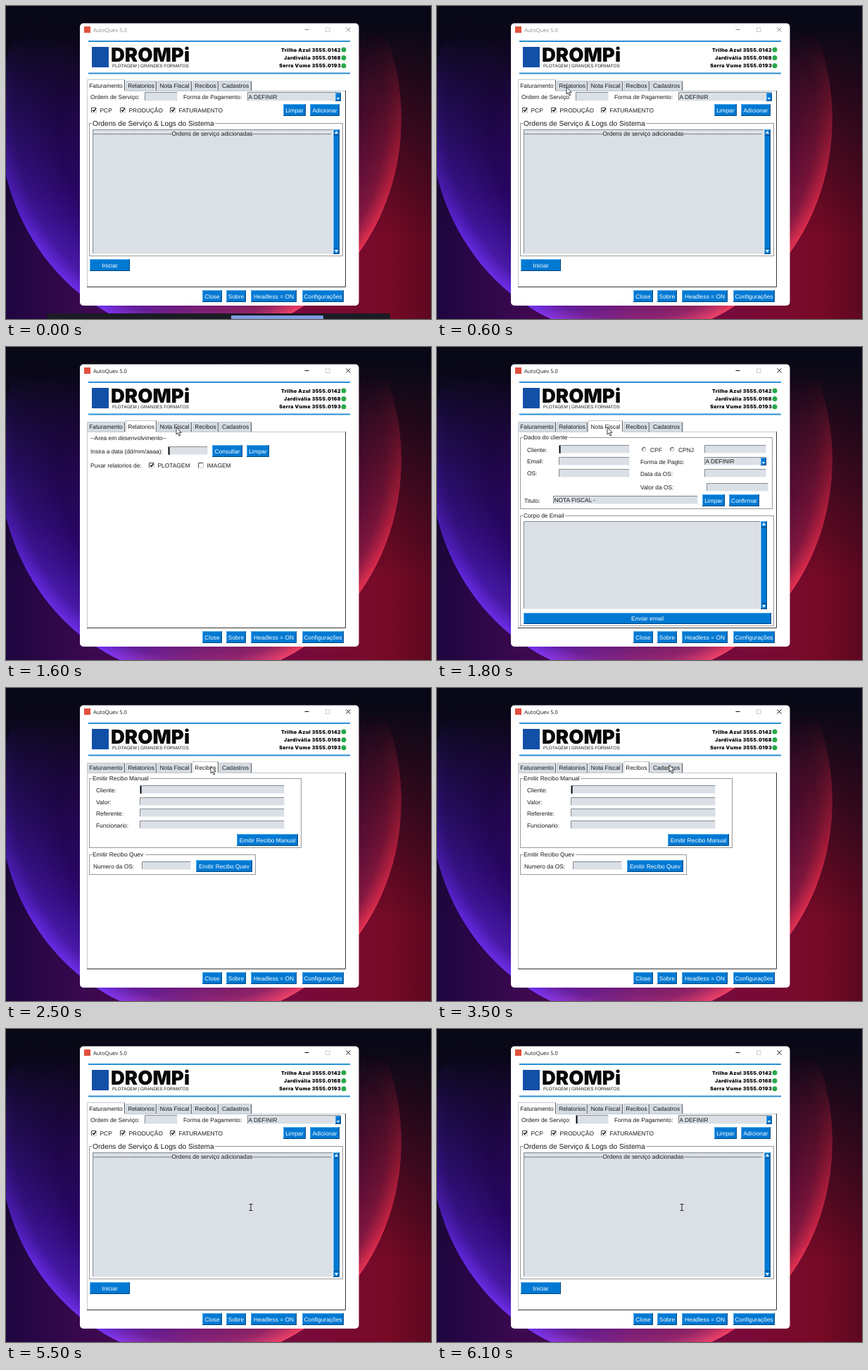
These frames come from a looping animation (604 px wide and 444 px high, 6.2 s). An HTML page:

```html
<!DOCTYPE html>
<html lang="pt">
<head>
<meta charset="utf-8">
<style>
html, body { margin: 0; width: 100%; height: 100%; overflow: hidden; background: #080816; }
svg {
  display: block; width: 604px; height: 444px;
  background:
    linear-gradient(#080816 5%, #08081600 75%),
    linear-gradient(90deg, #1e0640, #3c0850 20%, #780a40 65%, #780a26 90%, #5c0820);
}
text { font: 8.4px "Liberation Sans", Arial, sans-serif; fill: #1a1a1b; white-space: pre; text-rendering: geometricPrecision; }
.btn { fill: #fff; }
.title { font: 7.6px "Open Sans", sans-serif; }
.big { font-size: 10.2px; }
.brand { font: 900 27.5px Inter, sans-serif; fill: #080808; }
.slogan { font-size: 6.37px; }
.phone { font: 900 7.1px Inter, sans-serif; letter-spacing: .3px; fill: #080808; }
</style>
</head>
<body>
<svg id="stage" viewBox="0 0 604 444"></svg>
<script>
const BLUE = '#0079d3', FIELD = '#dae0e6', LOOP = 6200;

const rect = (x1, y1, x2, y2, fill, extra = '') =>
  `<rect x="${x1}" y="${y1}" width="${x2 - x1}" height="${y2 - y1}" fill="${fill}" ${extra}/>`;
const path = (d, stroke, fill = 'none', width = 1) =>
  `<path d="${d}" stroke="${stroke}" fill="${fill}" stroke-width="${width}"/>`;
const text = (x, y, s, cls = '', anchor = 'start') =>
  `<text x="${x}" y="${y}" class="${cls}" text-anchor="${anchor}">${s}</text>`;
const circle = (x, y, r, fill, stroke = 'none') =>
  `<circle cx="${x}" cy="${y}" r="${r}" fill="${fill}" stroke="${stroke}"/>`;

// Two-tone edge: first colour on top and left, second on bottom and right
const bevel = (x1, y1, x2, y2, fill, light, dark) => rect(x1, y1, x2, y2, fill) +
  path(`M${x1 + .5} ${y2}V${y1 + .5}H${x2}`, light) +
  path(`M${x1} ${y2 - .5}H${x2 - .5}V${y1}`, dark);
const sunken = (x1, y1, x2, y2) => bevel(x1, y1, x2, y2, FIELD, '#858a8f', '#eef1f4');
const raised = (x1, y1, x2, y2) => bevel(x1, y1, x2, y2, BLUE, '#5cb2ee', '#00467c');
const input = (x1, y1, x2, y2, s = '') => sunken(x1, y1, x2, y2) + text(x1 + 1.5, y2 - 3, s);
const button = (x1, y1, x2, y2, s) => raised(x1, y1, x2, y2) +
  text((x1 + x2) / 2, (y1 + y2) / 2 + 3, s, 'btn', 'middle');
const combo = (x1, y1, x2, y2) => input(x1, y1, x2, y2, 'A DEFINIR') +
  raised(x2 - 8, y1 + 1, x2, y2) + path(`M${x2 - 6} ${y2 - 5}h4l-2 3z`, 'none', '#fff');
const check = (x, y, s, on) => bevel(x, y, x + 8, y + 8, '#fff', '#444', '#ccc') +
  (on ? path(`M${x + 2} ${y + 3.5}l1.8 2 3-4`, '#111', 'none', 1.4) : '') + text(x + 12.5, y + 6.5, s);
const radio = (x, y, s) => circle(x, y, 3, '#fff', '#bbb') +
  path(`M${x - 2} ${y + 2}a3 3 0 0 1 4 -4`, '#333') + text(x + 9, y + 4, s);
const group = (x2, y1, y2, s, w, cls = '') =>
  rect(118.5, y1 + .5, x2 + .5, y2 + .5, 'none', 'stroke="#999"') +
  rect(122, y1 - 3, 123 + w + 1, y1 + 4, '#fff') + text(123, y1 + (cls ? 4 : 3), s, cls);
const log = (y1, x2, y2) => sunken(123, y1, x2, y2) + raised(x2, y1, x2 + 9, y2) +
  path(`M${x2 + 2} ${y1 + 6}h5l-2.5-4zM${x2 + 2} ${y2 - 6}h5l-2.5 4z`, 'none', '#fff') +
  path(`M${x2 + 1} ${y1 + 8.5}h7M${x2 + 1} ${y2 - 8.5}h7`, '#00467c');
const form = (labels, x1, x2) => labels.map((s, i) => {
  const y = Math.round(i * 16.6);
  return text(128, 148 + y, s) + input(x1, 138 + y, x2, 150 + y);
}).join('');

const dashes = '-'.repeat(40);
const pages = [
  text(120, 132, 'Ordem de Serviço:') + input(197, 122, 244, 135) +
    text(252, 132, 'Forma de Pagamento:') + combo(343, 122, 476, 135) +
    check(121, 144, 'PCP', 1) + check(162, 144, 'PRODUÇÃO', 1) + check(233, 144, 'FATURAMENTO', 1) +
    button(394, 139, 426, 156, 'Limpar') + button(432, 139, 474, 156, 'Adicionar') +
    group(478, 166, 354, 'Ordens de Serviço &amp; Logs do Sistema', 173, 'big') + log(175, 465, 352) +
    text(293, 184, dashes + 'Ordens de serviço adicionadas' + dashes, '', 'middle') +
    button(119, 359, 176, 376, 'Iniciar'),
  text(120, 132, '--Area em desenvolvimento--') + text(120, 150.5, 'Insira a data (dd/mm/aaaa):') +
    input(230, 141, 287, 153) + button(293, 139, 336, 156, 'Consultar') + button(342, 139, 374, 156, 'Limpar') +
    text(120, 170.5, 'Puxar relatorios de:') + check(203, 164, 'PLOTAGEM', 1) + check(273, 164, 'IMAGEM', 0),
  group(476, 128, 229, 'Dados do cliente', 63) +
    text(128, 149, 'Cliente:') + input(173, 139, 274, 151) + radio(294, 145, 'CPF') + radio(334, 145, 'CPNJ') +
    input(380, 139, 468, 151) +
    text(128, 165, 'Email:') + input(173, 156, 274, 168) + text(289, 166, 'Forma de Pagto:') + combo(380, 156, 468, 168) +
    text(128, 182, 'OS:') + input(173, 173, 274, 185) + text(289, 183, 'Data da OS:') + input(380, 173, 468, 185) +
    text(289, 202, 'Valor da OS:') + input(383, 193, 471, 205) +
    text(124, 220.5, 'Titulo:') + input(165, 211, 371, 223, 'NOTA FISCAL -') +
    button(377, 209, 409, 226, 'Limpar') + button(415, 209, 458, 226, 'Confirmar') +
    group(478, 239, 395, 'Corpo de Email', 58) + log(247, 460, 372) + button(123, 377, 475, 393, 'Enviar email'),
  group(419, 128, 226, 'Emitir Recibo Manual', 80) +
    form(['Cliente:', 'Valor:', 'Referente:', 'Funcionario:'], 190, 396) +
    button(328, 207, 415, 224, 'Emitir Recibo Manual') +
    group(354, 236, 264, 'Emitir Recibo Quev', 74) + text(124, 256, 'Numero da OS:') +
    input(193, 246, 263, 258) + button(270, 244, 350, 261, 'Emitir Recibo Quev'),
  group(401, 128, 226, 'Cadastros rapido de clientes', 107) +
    form(['Nome:', 'Telefone:', 'Email:', 'CPF/CNPJ:'], 188, 393) +
    button(266, 207, 330, 224, 'Limpar campos') + button(337, 207, 393, 224, 'Salvar cliente')
];
const tabs = [['Faturamento', 115, 169], ['Relatorios', 170, 214], ['Nota Fiscal', 215, 264],
  ['Recibos', 265, 302], ['Cadastros', 303, 349]];
const carets = [[198, 123], [231, 142], [174, 140], [191, 139], [189, 139]];

const tab = ([s, x1, x2], on) => {
  const y = on ? 104 : 106;
  return rect(x1, y, x2, on ? 121 : 120, on ? '#fff' : '#d5dce3') +
    path(`M${x1 + .5} 120V${y + .5}H${x2}`, '#c3c9cf') + path(`M${x2 - .5} ${y + 1}V120`, '#555') +
    text((x1 + x2) / 2, 116, s, '', 'middle');
};
const page = i => `<g class="page">${tabs.map((t, k) => tab(t, k === i)).join('')}${pages[i]}</g>`;

const orb = (fill, extra = '') => `<ellipse cx="276" cy="160" rx="286" ry="310" fill="${fill}" ${extra}/>`;
const across = (id, ...colors) =>
  `<linearGradient id="${id}" gradientUnits="userSpaceOnUse" x1="0" y1="0" x2="562" y2="0">${
    colors.map((c, i) => `<stop offset="${i / (colors.length - 1)}" stop-color="${c}"/>`).join('')}</linearGradient>`;
const mask = (id, content) =>
  `<mask id="${id}" maskUnits="userSpaceOnUse" x="-20" y="-160" width="660" height="660">${content}</mask>`;
const contact = (y, s) => text(476, y, s, 'phone', 'end') + circle(480, y - 2.5, 3.5, '#2aa84a');

stage.innerHTML = `
<defs>
  ${across('inside', '#1c0660', '#2a0670', '#400860', '#400848', '#2c0630')}
  ${across('rim', '#5a24d8', '#7a34f0', '#e84898', '#f04060', '#e02848')}
  <linearGradient id="fade" gradientUnits="userSpaceOnUse" x1="0" y1="40" x2="0" y2="330">
    <stop stop-color="#000"/><stop offset="1" stop-color="#fff"/>
  </linearGradient>
  <radialGradient id="edge">
    <stop offset=".7" stop-color="#000"/><stop offset=".92" stop-color="#777"/><stop offset="1" stop-color="#fff"/>
  </radialGradient>
  ${mask('low', rect(-20, -160, 640, 500, 'url(#fade)'))}
  ${mask('glow', orb('url(#edge)'))}
</defs>
<g mask="url(#low)">
  ${orb('url(#inside)')}
  ${orb('url(#rim)', 'mask="url(#glow)"')}
</g>
<g id="dock">${rect(58, 436, 546, 450, '#1b1b24', 'rx="3"')}${rect(320, 439, 451, 450, '#7f9be0', 'rx="1"')}</g>
${rect(105, 24.5, 501.5, 425, '#fff', 'rx="5"')}
${rect(111, 29, 120, 38, '#e2503c')}
<g id="bar">
  ${text(124, 36.5, 'AutoQuev 5.0', 'title')}
  ${path('M424.5 33.5h6M483.5 30.5l6 6m0-6l-6 6', '#111')}
</g>
${rect(454.5, 31, 460, 36.5, 'none', 'stroke="#ccc"')}
${rect(117, 49, 489, 51, '#2a8fd2')}${rect(117, 94.5, 489, 96.5, '#2a8fd2')}
${rect(122, 58, 146, 87, '#1250a8')}
${text(149, 79, 'DROMPi', 'brand')}
${text(151, 87, 'PLOTAGEM | GRANDES FORMATOS', 'slogan')}
${contact(64.5, 'Trilho Azul 3555.0142')}${contact(76, 'Jardivália 3555.0168')}${contact(87.3, 'Serra Vume 3555.0193')}
${path('M115.5 398V120.5H482', '#c3c9cf')}${path('M115 398.5H482.5V120', '#333')}
${button(279, 403, 307, 420, 'Close')}${button(313, 403, 341, 420, 'Sobre')}
${button(348, 403, 413, 420, 'Headless = ON')}${button(421, 403, 480, 420, 'Configurações')}
${pages.map((_, i) => page(i)).join('')}
<rect id="caret" width="1.5" height="11" fill="#000"/>
<g id="arrow">${path('M0 0V10L2.3 7.9 4 12 5.8 11.2 4.1 7.3H7.2z', '#111', '#fff', .8)}</g>
<g id="beam">${path('M-2.5-4.5H2.5M0-4.5V4.5M-2.5 4.5H2.5', '#222')}</g>`;

const route = [[100, 348, 432], [600, 184, 115], [1250, 184, 115], [1600, 242, 114], [1950, 242, 114],
  [2300, 291, 111], [2950, 291, 111], [3350, 330, 109], [3900, 330, 109], [4350, 140, 110],
  [4900, 140, 110], [5500, 348, 253], [LOOP, 348, 253]];
const clicks = [[700, 1], [1700, 2], [2400, 3], [3700, 4], [4700, 0]];
const pageNodes = document.querySelectorAll('.page');
const show = (node, on) => node.style.display = on ? '' : 'none';
const move = (node, x, y) => node.setAttribute('transform', `translate(${x} ${y})`);

function pointer(t) {
  const i = Math.max(1, route.findIndex(p => p[0] > t));
  const [t0, x0, y0] = route[i - 1], [t1, x1, y1] = route[i];
  const p = Math.max(0, (t - t0) / (t1 - t0)), e = p * p * (3 - 2 * p);
  return [x0 + (x1 - x0) * e, y0 + (y1 - y0) * e];
}

const start = performance.now();
function draw() {
  const t = Math.floor((performance.now() - start) % LOOP / 100) * 100; // ten steps a second
  const [since, current] = clicks.filter(c => c[0] <= t).pop() || [0, 0];
  const active = t >= 700;
  pageNodes.forEach((node, i) => show(node, i === current));
  bar.setAttribute('opacity', active ? 1 : .5);
  move(dock, 0, t / 25);

  show(caret, active && (t - since) % 900 < 600);
  move(caret, ...carets[current]);

  const [x, y] = pointer(t);
  const overLog = current === 0 && x > 123 && x < 465 && y > 175 && y < 352;
  show(arrow, t >= 100 && !overLog);
  show(beam, t >= 100 && overLog);
  move(arrow, x, y);
  move(beam, x, y);
  requestAnimationFrame(draw);
}
draw();
</script>
</body>
</html>
```
